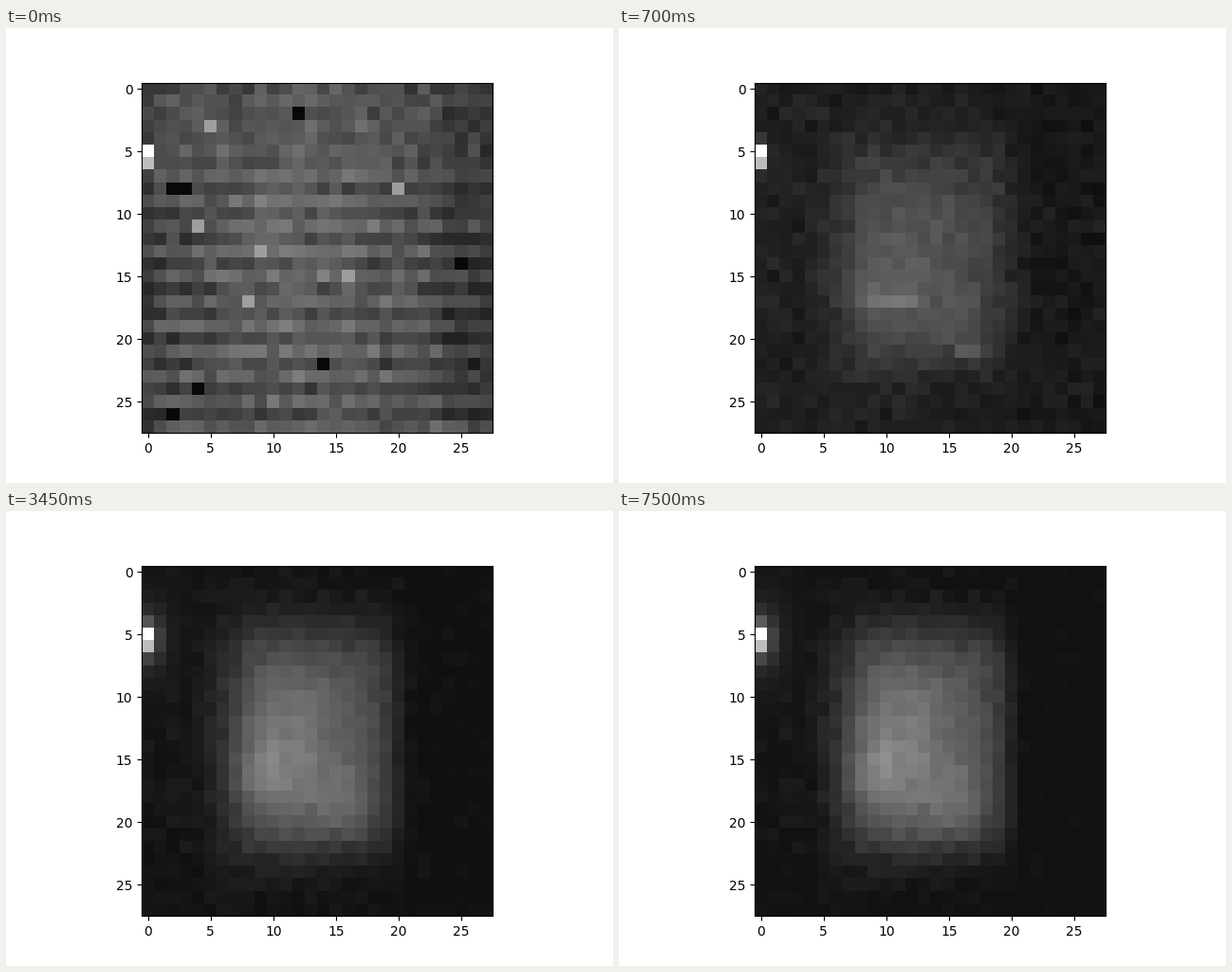
Recreate the animation shown at these times as a matplotlib script. Size 640 by 480 pixels, loop 10 s.

```python
import numpy as np
import matplotlib.pyplot as plt
from matplotlib.animation import FuncAnimation

SIZE, FRAMES, STEP = 28, 200, 50
rng = np.random.default_rng(4)
row, col = np.mgrid[:SIZE, :SIZE]


def noise(sigma):
    return np.clip(rng.normal(0, sigma, (SIZE, SIZE)), -2 * sigma, 2 * sigma)


def hill(r, c, height, width, power=2):
    """Bump centred on (r, c); a higher power gives a flatter top."""
    dr, dc = abs(row - r) / height, abs(col - c) / width
    return np.exp(-dr ** power - dc ** power)


# Pale blob: two flat plateaus with soft highlights on top.
blob = (22 * hill(13, 12.5, 11, 7.5, 6)
        + 42 * hill(13.5, 13.5, 8.5, 6.3, 6)
        + 45 * hill(14, 11, 6.5, 5)
        + 22 * hill(16, 9, 2.5, 2.3)
        + 22 * hill(18.5, 15.5, 3, 2.5))

# The settled picture and the half-settled one before it.
last = 19 - .25 * col + noise(4) + blob
mid = (32 - .25 * col + noise(5) + .58 * blob
       + 20 * hill(17, 10, .6, 3, 6) + 28 * hill(21, 16.5, .6, 1, 6))

# The first picture: odd rows light, even rows dark, with stray cells.
bands = np.where(row % 2, 1, -1) * np.where(row < 7, 5, 13)
first = (74 + bands + 26 * hill(13, 12.5, 14, 8)
         - 16 * (col > 23) - 16 * (col == 0) + noise(11))
for r, c in [(2, 12), (8, 2), (8, 3), (14, 25), (22, 14), (24, 4), (26, 2)]:
    first[r, c] = 8
for r, c in [(3, 5), (8, 20), (11, 4), (13, 9), (15, 16), (17, 8)]:
    first[r, c] = 158

# Bright spot on the left edge; its two core cells are lit throughout.
spot = 17 + 280 / (1 + 1.5 * ((row - 5.35) ** 2 + 3 * col ** 2))
core = (col == 0) & ((row == 5) | (row == 6))


def picture(i):
    fresh = np.exp(-.4 * i)
    settled = 1 - np.exp(-max(i - 14, 0) / 30)
    base = fresh * first + (1 - fresh) * mid - 72 * fresh * (1 - fresh)
    grey = base + settled * (last - base)
    glow = .6 * (1 - fresh) + .4 * settled
    grey = np.maximum(grey, spot * np.where(core, 1, glow))
    grey[5, 0] = 255
    return np.clip(grey, 0, 255)


fig, ax = plt.subplots(figsize=(6.4, 4.8), dpi=100)
image = ax.imshow(picture(0), cmap="gray", vmin=0, vmax=255)


def update(i):
    image.set_data(picture(i))
    return [image]


anim = FuncAnimation(fig, update, frames=FRAMES, interval=STEP,
                     repeat=True, repeat_delay=0)
plt.show()
```
